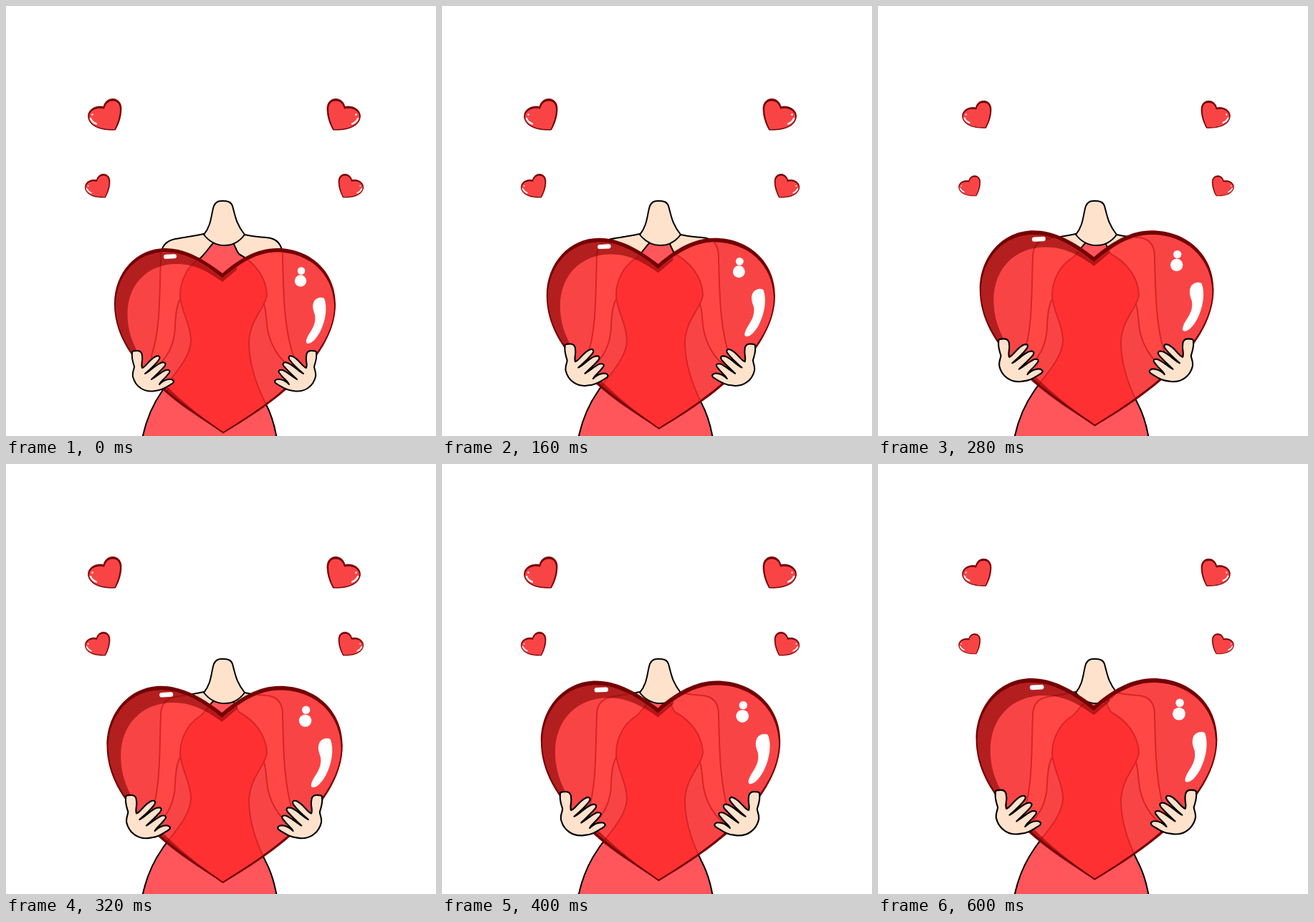
Write an HTML page that moves like this. It is 600 px wide and 600 px high and loops after 640 ms.

```html
<!DOCTYPE html>
<html lang="en">
<head>
<meta charset="utf-8">
<title>Growing heart</title>
<style>
  html, body { margin: 0; width: 100%; height: 100%; overflow: hidden; background: #fff; }
  svg { display: block; width: 100%; height: 100%; }
</style>
</head>
<body>
<svg id="stage" viewBox="0 0 600 600"></svg>
<script>
const RED = '#f94446', DARK = '#740003', SKIN = '#ffe2cc';
const LOOP = 640, STEP = 40;

const shapes = {
  leftArm: 'M276 318 C258 322 246 323 236 325 C222 328 216 337 216 350 C214 400 216 450 203 488 L208 504 C224 494 236 472 236 445 C237 425 239 414 244 408 L290 365 L300 330Z',
  rightArm: 'M333 319 C345 322 353 322 363 323 C378 324 386 332 386 350 C387 400 388 450 401 488 L399 504 C380 494 367 470 364 445 C363 430 362 422 360 416 L325 365 L310 330Z',
  dress: 'M290 330 C284 336 280 343 272 351 C255 361 243 381 243 404 C244 426 258 444 258 467 C257 493 232 516 218 537 C204 557 195 579 190 604 L378 604 C375 586 370 569 362 554 C349 528 339 498 339 469 C340 437 363 420 364 403 C363 378 347 358 325 346 C321 341 320 336 317 330Z',
  neck: 'M276 319 C287 306 286 291 290 279 C293 273 296 272 302 272 C309 272 314 273 316 279 C320 293 321 304 333 319 C325 330 315 334 305 334 C293 334 283 328 276 319Z',
  heart: 'M302 373 C276 353 250 338 222 338 C182 338 151 372 151 416 C151 455 172 487 200 517 C228 548 270 574 303 596.500 C337 576 382 548 410 517 C440 484 460 452 460 416 C460 370 424 338 378 338 C350 338 325 353 302 373Z',
  heartFace: 'M302 380 C276 359 250 343.500 222 343.500 C183 343.500 153.500 375 153 418 C153.500 455 174 486 202 515 C230 545 271 571 303 594 C337 573 380 545 408 515 C438 482 458 452 458 418 C457 374 423 343.500 378 343.500 C350 343.500 325 360 302 380Z',
  shade: 'M302 385 C280 369 262 360 238 360 C197 360 169.500 389 169.500 430 C169.500 452 176 470 187 489 L180 492 C163 468 153 444 153 418 C153.500 375 183 343.500 222 343.500 C250 343.500 276 359 302 380 L322 364 L322 368Z M218 535 C245 560 275 578 303 595 C272 573 246 552 224 530Z',
  shine: 'M429 414 C431 407 440 405 444 408 C449 420 446 440 438 455 C433 464 427 471 421 471 C417 470 419 465 422 459 C428 450 433 442 431 431 C429 425 427 420 429 414Z',
  hand: 'M176 485 C175 481 179 481 183 481 C188 481 190 484 190 489 C191 496 188 500 190 505 C195 504 200 493 209 489 C214 487 216 490 213 494 C208 501 201 507 194 513 C201 510 208 501 216 498 C222 496 224 499 221 503 C215 510 209 515 203 521 C210 517 216 511 223 508 C229 507 230 510 226 514 C222 520 216 523 214 528 C219 523 225 520 231 521 C236 523 234 526 230 528 C223 532 219 536 208 537 C192 540 180 530 177 517 C176 510 179 507 179 503 C177 497 175 491 176 485Z',
  mini: 'M136 140.500 C138 133 143 129.500 149 129.500 C157 129.500 161 136 161 143 C161 155 157 165 152.500 173 C141 173.500 129 172 121 166 C115 161 113 154 116 148 C120 141 129 139 136 140.500Z',
  miniFace: 'M137 143.500 C139 136 143 132.500 149 132.500 C156 132.500 159 138 159 144 C159 155 155 165 151.500 172 C141 172 130 171 122 165.500 C116 161 114.500 155 117 150 C121 143 130 141.500 137 143.500Z'
};

const path = (name, fill, line = 'none', width = 2) =>
  `<path d="${shapes[name]}" fill="${fill}" stroke="${line}" stroke-width="${width}" stroke-linejoin="round"/>`;

const mirror = (content, axis) =>
  `${content}<g transform="translate(${2 * axis} 0) scale(-1 1)">${content}</g>`;

const body = (skin, dress, line) =>
  path('leftArm', skin, line) + path('rightArm', skin, line) +
  path('dress', dress, line) + path('neck', skin, line);

const miniHeart = path('mini', DARK, DARK, 0.8) + path('miniFace', RED) +
  `<path d="M118 157 Q120 162 126 164.500" fill="none" stroke="#fff" stroke-width="2.400" stroke-linecap="round"/>
   <circle cx="120.500" cy="151.500" r="1.300" fill="#fff"/>`;

const miniPair = `<g class="mini" data-x="138" data-y="151.500" data-size="1">${miniHeart}</g>
  <g class="mini" data-x="127.800" data-y="251" data-size=".75">${miniHeart}</g>`;

document.getElementById('stage').innerHTML = `
  <defs><clipPath id="face"><path class="grow" d="${shapes.heartFace}"/></clipPath></defs>
  <rect width="600" height="600" fill="#fff"/>
  ${mirror(miniPair, 304.5)}
  ${body(SKIN, '#ff565c', '#000')}
  <g class="grow">${path('heart', DARK)}${path('heartFace', RED)}</g>
  <g clip-path="url(#face)">${body('#ff4845', '#ff3032', '#d92426')}</g>
  <g class="grow">
    ${path('shade', 'rgba(122,0,0,.55)')}
    <rect x="220" y="346.500" width="18" height="6" rx="3" fill="#fff" transform="rotate(-3 229 349.500)"/>
    <circle cx="412" cy="369.500" r="5.300" fill="#fff"/>
    <circle cx="411" cy="383.500" r="8.200" fill="#fff"/>
    ${path('shine', '#fff')}
    ${mirror(path('hand', SKIN, '#000'), 304.5)}
  </g>`;

const growing = document.querySelectorAll('.grow');
const minis = document.querySelectorAll('.mini');

// Steady growth, then a short settle into the final size.
function growth(step) {
  if (step <= 10) return step / 11;
  const rest = Math.max(0, 1 - (step - 10) / 4);
  return (11 - rest ** 3) / 11;
}

function draw(time) {
  const step = Math.floor((time % LOOP) / STEP);
  const k = growth(step);
  const scale = 1 + 0.09 * k;
  const place = `translate(311 ${338 - 39 * k}) scale(${scale}) translate(-311 -338)`;
  growing.forEach(el => el.setAttribute('transform', place));

  const pulse = step % 2 ? 0.87 : 1;
  minis.forEach(el => {
    const { x, y, size } = el.dataset;
    el.setAttribute('transform',
      `translate(${x} ${y}) scale(${size * pulse}) translate(-138 -151.5)`);
  });
}

let start;
function tick(now) {
  start ??= now;
  draw(now - start);
  requestAnimationFrame(tick);
}
draw(0);
requestAnimationFrame(tick);
</script>
</body>
</html>
```
